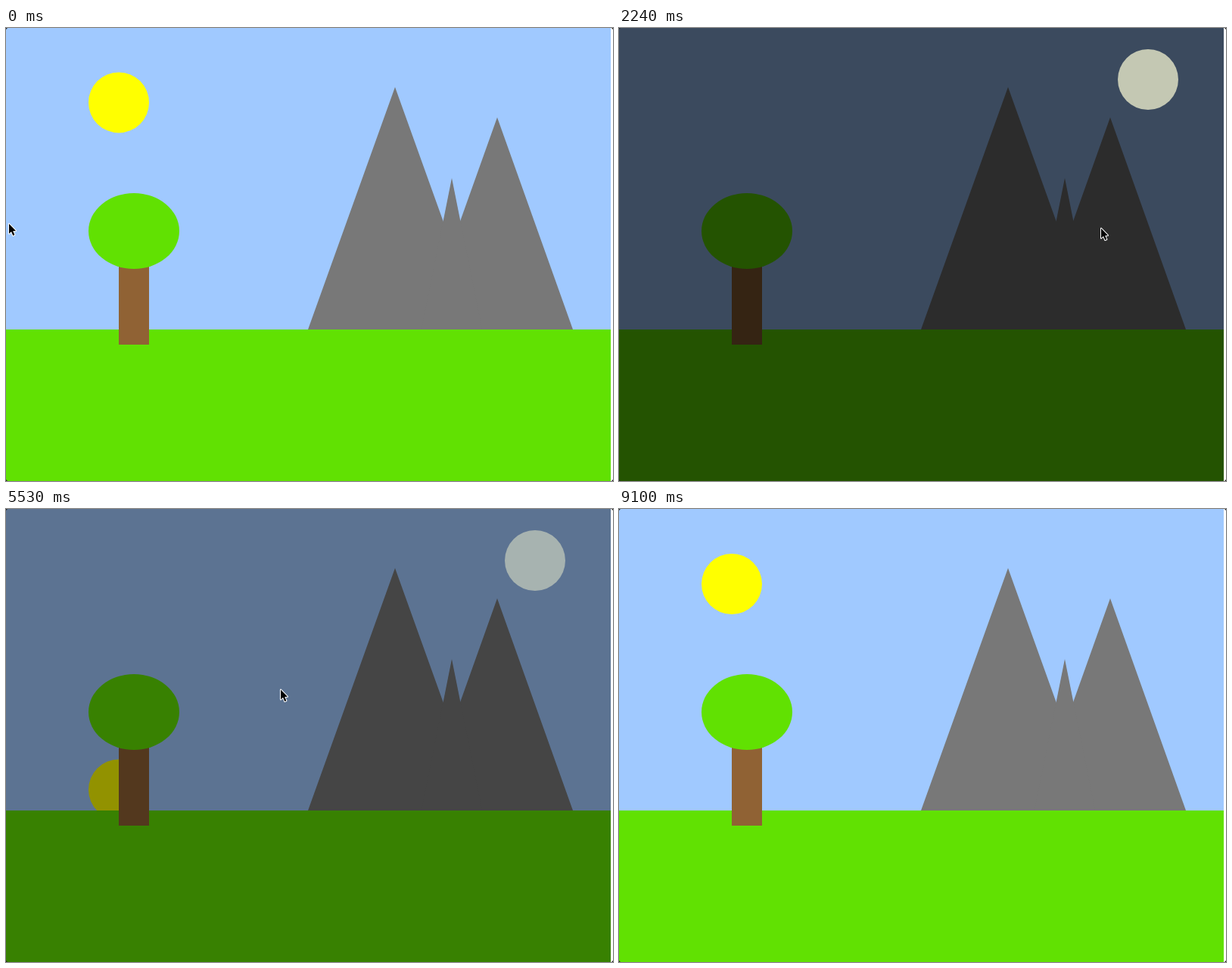
Recreate the animation shown at these times as an HTML page with a canvas. Size 802x598 px, loop 9170 ms.

```html
<!DOCTYPE html>
<html lang="en">
<head>
<meta charset="utf-8">
<title>Day and night</title>
<style>
  html, body { margin: 0; width: 100%; height: 100%; overflow: hidden; background: #fff; }
  canvas { display: block; width: 100vw; height: 100vh; }
</style>
</head>
<body>
<canvas id="stage" width="802" height="598"></canvas>
<script>
const LOOP = 9170, STEP = 70, LAG = 110;
const ctx = document.getElementById('stage').getContext('2d');

// Pointer path: time, x, y of the tip
const path = [
  [0, 3, 257], [420, 14, 254], [560, 18, 253], [940, 110, 249], [1050, 154, 248],
  [1540, 352, 243], [2100, 640, 261], [2240, 636, 263], [2590, 636, 264],
  [2800, 639, 266], [3150, 639, 266], [3500, 728, 268], [3850, 788, 270],
  [4200, 788, 270], [4500, 722, 269], [4760, 669, 268], [4930, 669, 268],
  [5040, 639, 267], [5420, 435, 243], [5530, 362, 237], [5880, 205, 230],
  [6330, 62, 226], [6440, 12, 225], [6580, 4, 225], [LOOP, 4, 225]
];
const EXIT = 6580;

const clamp = (v, lo, hi) => Math.min(hi, Math.max(lo, v));

function pointer(t) {
  t = clamp(t, 0, LOOP);
  const i = Math.max(1, path.findIndex(k => k[0] >= t));
  const [t0, x0, y0] = path[i - 1], [t1, x1, y1] = path[i];
  const f = (t - t0) / (t1 - t0);
  return { x: x0 + (x1 - x0) * f, y: y0 + (y1 - y0) * f };
}

function rect(color, x, y, w, h) {
  ctx.fillStyle = color;
  ctx.fillRect(x, y, w, h);
}

function oval(color, x, y, rx, ry = rx) {
  ctx.fillStyle = color;
  ctx.beginPath();
  ctx.ellipse(x, y, rx, ry, 0, 0, Math.PI * 2);
  ctx.fill();
}

function poly(color, ...pts) {
  ctx.fillStyle = color;
  ctx.beginPath();
  pts.forEach(([x, y]) => ctx.lineTo(x, y));
  ctx.closePath();
  ctx.fill();
}

function drawPointer({ x, y }) {
  ctx.save();
  ctx.translate(x, y);
  ctx.lineJoin = 'round';
  ctx.lineWidth = 2;
  ctx.strokeStyle = '#fff';
  ctx.beginPath();
  [[1, 1.5], [1, 14.5], [4, 11.7], [6.3, 17], [8.4, 16.1], [6.2, 10.9], [10, 10.7]]
    .forEach(([px, py]) => ctx.lineTo(px, py));
  ctx.closePath();
  ctx.stroke();
  ctx.fillStyle = '#000';
  ctx.fill();
  ctx.restore();
}

function draw(t) {
  const drop = Math.max(0, pointer(t - LAG).x * 0.63 - 1.5);
  const moonlight = drop / 504 * clamp((t - 1050) / 350, 0, 1);
  const grass = 'rgb(97,225,2)', rock = 'rgb(120,120,120)';

  rect('rgb(160,201,255)', 0, 0, 802, 598);
  oval('rgb(255,255,0)', 149, 98 + drop, 40);
  poly(rock, [399, 398], [514, 78], [629, 398]);
  poly(rock, [549, 398], [649, 118], [749, 398]);
  poly(rock, [549, 398], [589, 198], [629, 398]);
  rect(grass, 0, 398, 802, 200);
  rect('rgb(144,98,52)', 149, 298, 40, 120);
  oval(grass, 169, 268, 60, 50);

  rect(`rgba(0,0,0,${drop * 0.00157})`, 0, 0, 802, 598);
  oval(`rgba(232,233,202,${moonlight})`, 699, 68, 40);

  // Window edge
  rect('#fff', 799, 0, 3, 598);
  poly('#222', [0, 0], [2, 0], [0, 2]);
  poly('#222', [802, 0], [800, 0], [802, 2]);
  poly('#222', [0, 598], [2, 598], [0, 596]);
  poly('#222', [802, 598], [800, 598], [802, 596]);

  if (t < EXIT) drawPointer(pointer(t));
}

const start = performance.now();
function tick() {
  const t = (performance.now() - start) % LOOP;
  draw(Math.floor(t / STEP) * STEP);
  requestAnimationFrame(tick);
}
tick();
</script>
</body>
</html>
```
